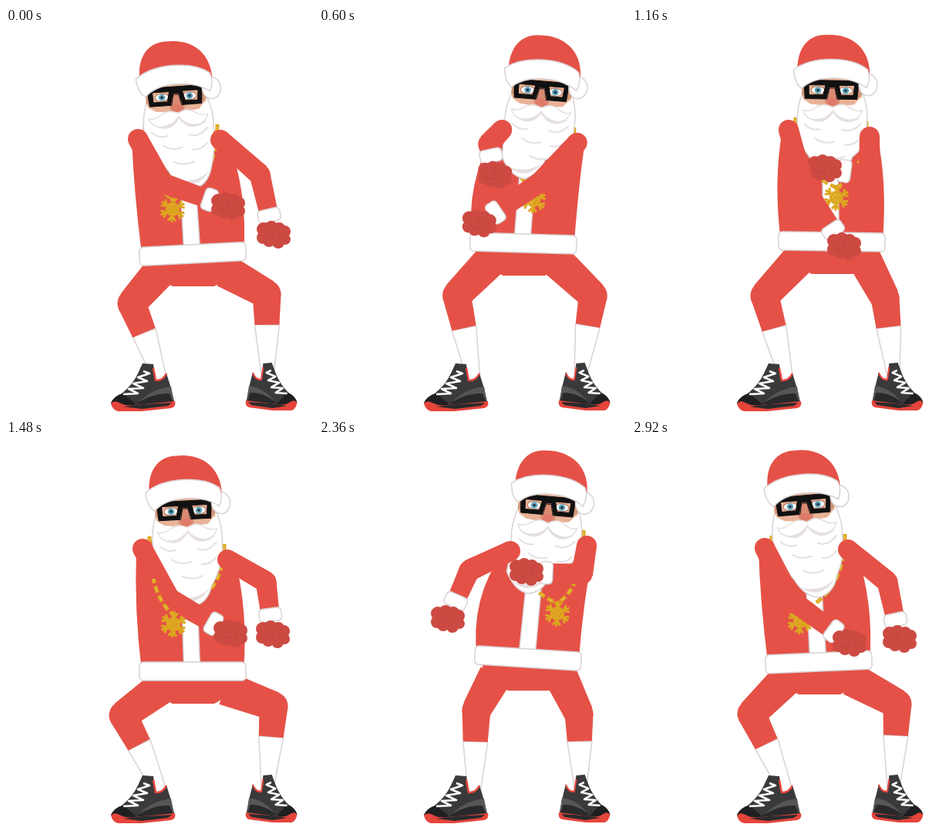
An HTML page with a canvas that plays this animation: 398 px wide and 498 px high, repeating every 2.96 s.

```html
<!DOCTYPE html>
<html lang="en">
<head>
<meta charset="utf-8">
<title>Dancing Santa</title>
<style>
html, body { margin: 0; width: 100%; height: 100%; overflow: hidden; background: #fff; }
canvas { display: block; }
</style>
</head>
<body>
<canvas id="stage" width="398" height="498"></canvas>
<script>
const g = document.getElementById('stage').getContext('2d');
const RED = '#e55147', MITTEN = '#cc4a42', WHITE = '#fff', EDGE = '#d9d2d3',
      SHADE = '#e6dfe2', GOLD = '#dda71f', DARK = '#3a393b', SKIN = '#e9b296';
const LOOP = 2960, STEP = 40;

// Pose: hem and head are x, y, degrees; arms are shoulder, elbow, hand
const pose = (hem, head, armL, armR, knees, charm) => [hem, head, armL, armR, knees, charm];
const leftLow = pose([242, 293, -3], [219, 89, -4], [171, 144, 202, 201, 288, 231],
  [278, 145, 329, 190, 347, 268], [163, 357, 338, 345], [216, 235]);
const crossUp = pose([259.5, 275, -2], [256, 78, -1.5], [206, 142, 205, 188, 266, 181],
  [309, 131, 293, 205, 240, 285], [186, 350, 340, 347], [248, 218]);
const rightWide = pose([285, 281, -1.5], [292, 79, 2], [240, 143, 195, 168, 187, 230],
  [342, 135, 339, 176, 272, 171], [185, 342, 380, 348], [311, 217]);
const crossBack = pose([259, 277, 1], [258, 81, 1], [203, 132, 222, 205, 275, 283],
  [308, 141, 308, 190, 250, 182], [172, 347, 328, 350], [265, 220]);
const leftDeep = pose([242, 300, 0], [231, 92, -3], [177, 141, 211, 205, 291, 251],
  [287, 155, 337, 184, 346, 252], [152, 357, 347, 345], [217, 239]);
const rightCross = pose([263, 279, 2], [287, 82, 5], [237, 131, 222, 149, 232, 187],
  [334, 150, 285, 200, 202, 261], [178, 347, 353, 347], [275, 224]);
const rightTall = pose([271, 283, 3.5], [296, 86, 5], [248, 144, 195, 169, 167, 232],
  [347, 137, 341, 174, 269, 171], [204, 350, 337, 355], [309, 225]);
const leftEnd = pose([242, 288, -2.5], [222, 85, -5], [172, 140, 206, 207, 282, 263],
  [280, 142, 331, 184, 347, 258], [155, 355, 344, 342], [218, 235]);

const timeline = [
  [0, leftLow], [360, crossUp], [540, rightCross], [880, rightWide], [1160, crossBack],
  [1400, leftDeep], [1560, leftDeep], [1960, rightCross], [2220, rightWide],
  [2360, rightTall], [2600, crossBack], [2800, leftDeep], [2920, leftEnd], [LOOP, leftLow]
];

function poseAt(t) {
  const i = timeline.findIndex(k => k[0] > t);
  const [t0, a] = timeline[i - 1], [t1, b] = timeline[i];
  const u = (t - t0) / (t1 - t0), e = u * u * (3 - 2 * u);
  return a.map((part, j) => part.map((v, k) => v + (b[j][k] - v) * e));
}

function paint(path, fill, stroke, width = 1.5) {
  const p = typeof path === 'string' ? new Path2D(path) : path;
  if (fill) { g.fillStyle = fill; g.fill(p); }
  if (stroke) { g.strokeStyle = stroke; g.lineWidth = width; g.stroke(p); }
}
function poly(points, fill, stroke) {
  paint('M' + points.map(p => p.join(' ')).join('L') + 'Z', fill, stroke);
}
function oval(x, y, rx, ry, fill, stroke, width) {
  const p = new Path2D();
  p.ellipse(x, y, rx, ry, 0, 0, 7);
  paint(p, fill, stroke, width);
}
function bar(x, y, w, h, r, fill, stroke) {
  const p = new Path2D();
  p.roundRect(x, y, w, h, r);
  paint(p, fill, stroke);
}
function at(x, y, angle, draw) {
  g.save();
  g.translate(x, y);
  g.rotate(angle);
  draw();
  g.restore();
}

// Straight piece of a limb that narrows from radius ra to rb
function taper(ax, ay, bx, by, ra, rb, fill, stroke) {
  const d = Math.hypot(bx - ax, by - ay) || 1, nx = (ay - by) / d, ny = (bx - ax) / d;
  poly([[ax + nx * ra, ay + ny * ra], [bx + nx * rb, by + ny * rb],
    [bx - nx * rb, by - ny * rb], [ax - nx * ra, ay - ny * ra]], fill, stroke);
}

function leg(hipX, hipY, kx, ky, ax, ay) {
  const u = 0.42, hx = kx + (ax - kx) * u, hy = ky + (ay - ky) * u;
  taper(hx, hy, ax, ay + 10, 16, 8, WHITE, EDGE);
  taper(hipX, hipY, kx, ky, 22, 19, RED);
  oval(kx, ky, 18.5, 18.5, RED);
  taper(kx, ky, hx, hy, 18.5, 16, RED);
}

function legs([x, y], [lx, ly, rx, ry]) {
  leg(x - 42, y + 22, lx, ly, 201, 448);
  leg(x + 42, y + 22, rx, ry, 339, 440);
  poly([[x - 61, y], [x + 61, y], [x + 56, y + 26], [x + 28, y + 42],
    [x - 26, y + 42], [x - 56, y + 26]], RED);
}

function shoe() {
  paint('M136 487Q138 479 150 474Q164 463 171 448L177 435L191 436L194 457Q203 458 208 448L213 464L219 488Z', DARK);
  paint('M136 486Q142 476 152 474L170 489L160 493Z', '#1f1f21');
  paint('M168 490Q186 468 214 465L218 487Z', '#565557');
  paint('M166 489Q190 473 212 474L217 486Z', '#29292b');
  paint('M191 441L194 457Q203 458 208 448', null, '#e8463c', 2.5);
  paint('M136 487Q140 482 147 486Q156 491 168 489L219 484Q221 491 214 493L176 497H145Q138 495 136 487Z', '#e5453b');
  paint('M152 491L178 488L215 486L210 490L176 494Z', '#2b2a2c');
  paint('M178 445L186 448L171 453L183 458L165 461L178 467L159 468L171 474L152 475', null, WHITE, 2.6);
}

function torso([x, y], [lx, ly], [rx, ry]) {
  paint(`M${lx - 8} ${ly}Q${x - 76} ${y - 78} ${x - 66} ${y}L${x + 66} ${y}
    Q${x + 72} ${y - 78} ${rx + 10} ${ry}L${rx} ${ry - 12}L${lx} ${ly - 12}Z`, RED);
  const topX = x - 1 + ((lx + rx) / 2 - x) * 0.3;
  taper(topX, y - 90, x - 1, y - 8, 10, 10.5, WHITE, EDGE);
}

function chain(nx, ny, cx, cy) {
  const link = `M${nx} ${ny}Q${nx} ${cy - 35} ${cx} ${cy - 13}`;
  g.setLineDash([9, 4]);
  paint(link, null, GOLD, 5);
  g.setLineDash([4, 9]);
  g.lineDashOffset = -2.5;
  paint(link, null, '#f0c95c', 1.2);
  g.setLineDash([]);
  g.lineDashOffset = 0;
}

function snowflake(x, y) {
  for (let i = 0; i < 6; i++) at(x, y, i * Math.PI / 3 + 0.08, () =>
    paint('M0 0V-17M-5 -15L0 -9L5 -15M-4 -8L0 -4L4 -8', null, GOLD, 3));
}

function beard([x, y, deg], [bx, by]) {
  const a = deg * Math.PI / 180, dx = bx - x, dy = by - 84 - y;
  const tx = dx * Math.cos(a) + dy * Math.sin(a), ty = dy * Math.cos(a) - dx * Math.sin(a);
  at(x, y, a, () => {
    paint(`M-36 2Q-45 24 -43 46Q-42 68 ${tx - 30} ${ty - 26}Q${tx - 18} ${ty - 2} ${tx} ${ty}
      Q${tx + 20} ${ty - 3} ${tx + 26} ${ty - 26}Q48 72 47 46Q50 24 40 0Z`, WHITE, EDGE);
    paint(`M${tx - 22} ${ty - 14}Q${tx + 4} ${ty + 4} ${tx + 23} ${ty - 22}
      Q${tx + 4} ${ty - 6} ${tx - 22} ${ty - 14}Z`, SHADE);
    paint('M-34 44Q-24 54 -13 50M-20 62Q-8 71 6 66M14 50Q28 56 40 42M18 70Q30 72 38 62M-8 84Q6 92 20 85',
      null, SHADE, 2);
  });
}

function mitten(x, y) {
  oval(x, y, 18, 14, MITTEN);
  for (const [dx, dy, r] of [[-13, -7, 9], [-3, -10, 8], [7, -8, 8], [14, -4, 8],
    [15, 6, 7], [6, 10, 8], [-6, 8, 8], [-14, 4, 8]]) oval(x + dx, y + dy, r, r, MITTEN);
  paint(`M${x - 4} ${y - 9}q5 5 2 10M${x + 6} ${y - 5}q5 5 1 10M${x - 12} ${y + 2}q6 5 13 3`,
    null, '#bd433c', 1);
}

function arm([sx, sy, ex, ey, hx, hy]) {
  const a = Math.atan2(hy - ey, hx - ex), far = Math.hypot(hx - ex, hy - ey);
  const cut = Math.max(0, far - 25);
  const wx = ex + Math.cos(a) * cut, wy = ey + Math.sin(a) * cut;
  oval(sx, sy, 13, 13, RED);
  taper(sx, sy, ex, ey, 13, 14, RED);
  oval(ex, ey, 13.5, 13.5, RED);
  taper(ex, ey, wx, wy, 13.5, 12, RED);
  at(wx, wy, a, () => bar(-9, -14.5, 17, 29, 5, WHITE, EDGE));
  mitten(hx, hy);
}

function eye(x, closed) {
  if (closed) {
    oval(x, 0, 10, 5, '#eec0a8');
    paint(`M${x - 9} 1Q${x} 6 ${x + 9} 1`, null, '#a8705d', 1.3);
    return;
  }
  oval(x, 0, 9, 5, WHITE, '#a8705d', 1);
  oval(x, 0, 4.3, 4.3, '#62a7bd');
  oval(x, 0, 1.8, 1.8, '#25323b');
}

function head([x, y, deg], closed) {
  at(x, y, deg * Math.PI / 180, () => {
    paint('M-36 -22H38L40 10Q36 26 4 28Q-34 26 -37 8Z', SKIN);
    paint('M33 -14Q43 -14 40 6L34 10Z', '#d39578');
    paint('M-37 -16L-32 -14L-34 8L-38 6Z', '#d39578');
    eye(-17, closed);
    eye(19, closed);
    paint('M-1 -6Q-7 10 -8 14Q-5 21 2 20Q10 21 12 14Q9 8 6 -6Z', '#d98a72');
    oval(2, 15, 7, 5, '#df7a69');
    paint('M-35 -13L36 -13L34 11L8 11L5 -3H-2L-5 11L-33 11ZM-29 -7V6H-10L-7 -7ZM10 -7L13 6H29L31 -7Z'
      .replace(/Z$/, 'Z'), null, '#111', 1);
    const frame = new Path2D('M-36 -13H36L34 11H9L5 -4H-2L-6 11H-34ZM-29 -7L-28 6H-10L-7 -7ZM10 -7L13 6H29L30 -7Z');
    g.fillStyle = '#111';
    g.fill(frame, 'evenodd');
    paint('M-36 12Q-42 25 -38 34Q-18 47 2 30Q22 48 43 34Q44 22 39 8L30 18L3 21L-26 18Z', WHITE);
    paint('M-33 34Q-10 50 3 29Q18 50 39 34Q20 41 4 24Q-12 40 -33 34Z', SHADE);
    paint('M3 22Q-9 15 -20 23Q-29 29 -36 26Q-32 39 -18 38Q-4 37 3 26Q10 37 24 38Q37 38 41 25Q33 28 25 22Q14 14 3 22Z',
      WHITE, SHADE);
    paint('M-44 -25C-45 -58 -27 -73 -6 -72C20 -74 49 -60 50 -22Z', RED);
    oval(48, -8, 12, 14, WHITE, EDGE);
    paint('M-49 -26C-25 -45 25 -45 47 -28Q52 -17 46 -4C25 -20 -20 -21 -38 -2Q-47 -7 -49 -26Z', WHITE, EDGE);
  });
}

function draw(t) {
  const [hem, face, armL, armR, knees, charm] = poseAt(t);
  const [cx, cy] = charm;
  g.clearRect(0, 0, 398, 498);
  g.lineJoin = 'round';
  legs(hem, knees);
  shoe();
  g.save();
  g.transform(-0.8, 0, 0, 1, 486.2, -1);
  shoe();
  g.restore();
  torso(hem, armL, armR);
  const neckX = armL[0] + 9, neckY = armL[1] - 16;
  chain(neckX, neckY, cx, cy);
  chain(armR[0] - 4, armR[1] - 20, cx, cy);
  beard(face, hem);
  snowflake(cx, cy);
  at(hem[0], hem[1], hem[2] * Math.PI / 180, () => bar(-69, -12, 138, 24, 5, WHITE, EDGE));
  arm(armR);
  arm(armL);
  // The chain swings over the sleeve while leaning left
  if (t >= 1400 && t <= 1560) {
    g.save();
    g.beginPath();
    g.rect(0, 180, 398, 60);
    g.clip();
    chain(neckX, neckY, cx, cy);
    g.restore();
    snowflake(cx, cy);
  }
  head(face, t >= 280 && t <= 440);
}

const start = performance.now();
function tick() {
  const t = (performance.now() - start) % LOOP;
  draw(Math.floor(t / STEP) * STEP);
  requestAnimationFrame(tick);
}
tick();
</script>
</body>
</html>
```
